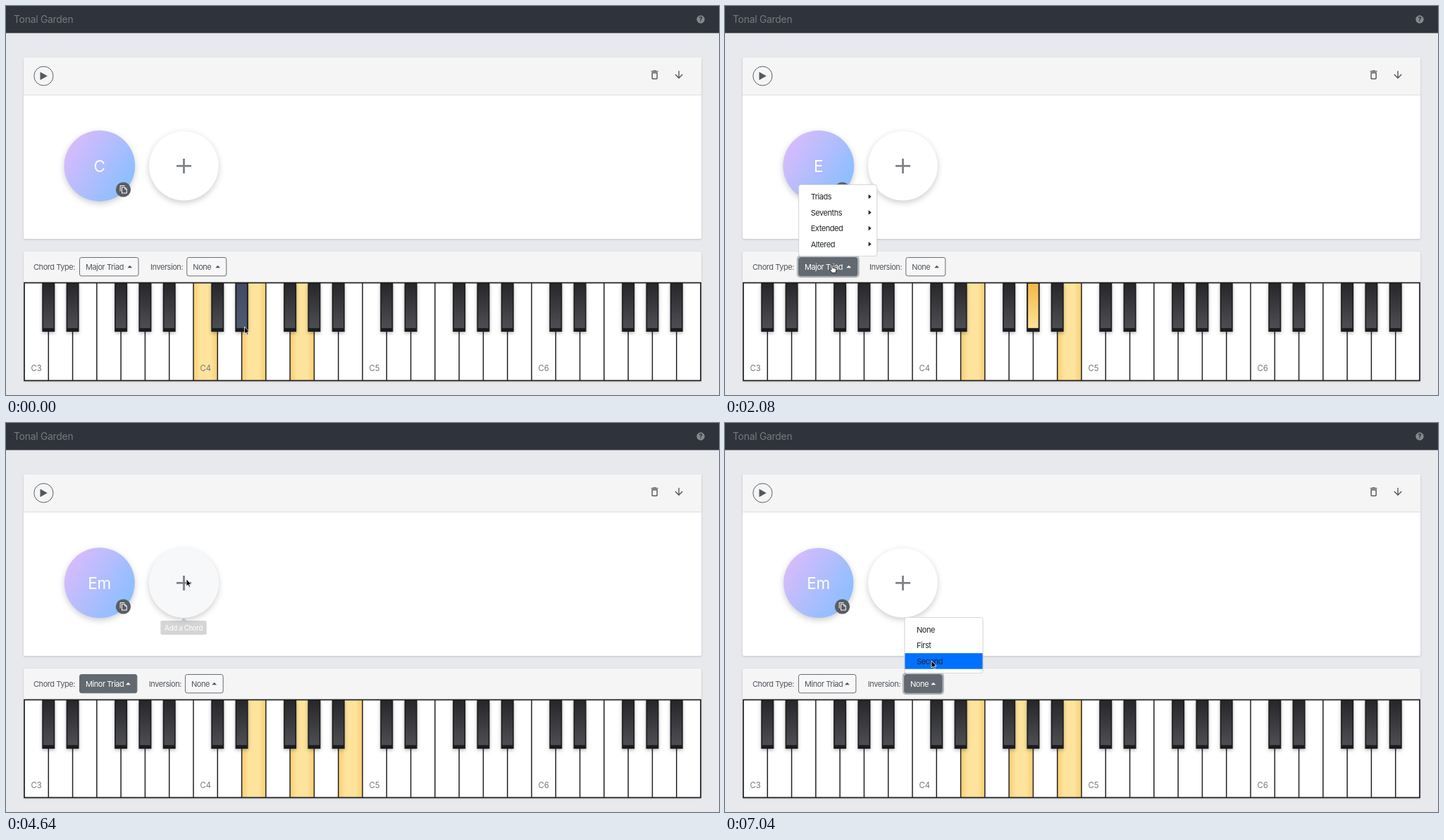
These frames come from a looping animation (1012x553 px, 7200 ms). An HTML page:

```html
<!DOCTYPE html>
<html lang="en">
<head>
<meta charset="utf-8">
<title>Tonal Garden</title>
<style>
  html, body { margin: 0; width: 100%; height: 100%; overflow: hidden; background: #e8e9ed; }
  svg { display: block; width: 100%; height: 100%; }
  text { font-family: Inter, Roboto, sans-serif; letter-spacing: -.04em; white-space: pre; }
  .card { filter: drop-shadow(0 1px 1.5px rgba(0,0,0,.16)); }
  .round { filter: drop-shadow(0 3px 4px rgba(0,0,0,.2)); }
  .menu { filter: drop-shadow(0 0 .5px rgba(0,0,0,.2)); }
  .black { filter: drop-shadow(0 2px 2.5px rgba(0,0,0,.28)); }
</style>
</head>
<body>
<script>
const LOOP = 7200, STEP = 160;
const KEY_W = 960 / 28, KEY_X = 26, KEY_TOP = 393.5, KEY_BOTTOM = 532.5;

// Event times in ms
const E_CHORD = 800, OPEN_TYPE = 1760, OPEN_TRIADS = 3360, EM_CHORD = 4480,
      OPEN_INVERSION = 5440, PRESS = 7040;

const range = n => [...Array(n).keys()];
const rect = (x, y, w, h, fill, more = '') =>
  `<rect x="${x}" y="${y}" width="${w}" height="${h}" fill="${fill}" ${more}/>`;
const path = (d, more = '') => `<path d="${d}" ${more}/>`;
const text = (s, x, y, size = 11, fill = '#212529', more = '') =>
  `<text x="${x}" y="${y + size * .364}" font-size="${size}" fill="${fill}" ${more}>${s}</text>`;
const during = (from, to, body) => `<g data-on="${from} ${to}">${body}</g>`;
const gradient = (id, dir, ...stops) =>
  `<linearGradient id="${id}" ${dir}>${stops.map(([o, c]) =>
    `<stop offset="${o}" stop-color="${c}"/>`).join('')}</linearGradient>`;

const DOWN = 'x1="0" y1="0" x2="0" y2="1"';
const defs = `<defs>
  ${gradient('chord', 'x1=".05" y1=".2" x2=".95" y2=".8"', [0, '#d9bbfc'], [1, '#88bfff'])}
  ${gradient('ebony', DOWN, [0, '#27272a'], [1, '#4d4e53'])}
  ${gradient('hover', DOWN, [0, '#414c62'], [1, '#4e5a72'])}
  ${gradient('gold', DOWN, [0, '#f4b748'], [1, '#fde496'])}
  ${gradient('amber', '', [0, '#f8cd71'], [.28, '#fde39b'], [.72, '#fde39b'], [1, '#f8cd71'])}
</defs>`;

function header() {
  return rect(0, 0, 1012, 38.5, '#2f333c') +
    text('Tonal Garden', 11, 19, 13.8, '#77797e', 'style="letter-spacing:-.015em"') +
    '<circle cx="986" cy="19" r="5.7" fill="#85888d"/>' +
    text('?', 986, 19.2, 9, '#2f333c', 'text-anchor="middle" font-weight="800"');
}

function toolbar() {
  const icon = (x, y, d) =>
    path(d, `transform="translate(${x} ${y}) scale(.703)" fill="#53575d" fill-rule="evenodd"`);
  return `<g class="card">${rect(25, 73, 962, 258, '#fff', 'rx="2.5"')}</g>` +
    path('M25 126.5V75.5Q25 73 27.500 73H984.5Q987 73 987 75.5V126.5Z', 'fill="#f5f5f5"') +
    rect(25, 126, 962, 1, '#dedede') +
    '<circle cx="53.4" cy="99.5" r="13.6" fill="none" stroke="#5a5f66"/>' +
    path('M48.500 93.800L58.800 99.500L48.500 105.200Z', 'fill="#53585f"') +
    icon(912.2, 89.4, 'M6 19c0 1.1.9 2 2 2h8c1.1 0 2-.9 2-2V7H6zM8 9h8v10H8zM15.5 4l-1-1h-5l-1 1H5v2h14V4z') +
    icon(946.6, 89.4, 'M20 12l-1.4-1.4L13 16.2V4h-2v12.200l-5.600-5.600L4 12l8 8z');
}

function circles() {
  const name = (s, from, to) =>
    during(from, to, text(s, 132.6, 228, 22.5, '#fff', 'text-anchor="middle" style="letter-spacing:-.01em"'));
  const copyIcon = path('M162.200 263.500V255.500H168.500M164.500 257.700H169L171.300 260V266H164.500ZM168.800 257.900V260.300H171',
    'fill="none" stroke="#fff"');
  return `<circle id="pulse" class="round" cx="132.8" cy="227.3" r="50" fill="url(#chord)"/>` +
    name('C', 0, E_CHORD) + name('E', E_CHORD, EM_CHORD) + name('Em', EM_CHORD, LOOP) +
    '<circle cx="166.5" cy="261" r="10.6" fill="#5a5d62"/>' + copyIcon +
    '<circle class="round" cx="252.4" cy="227.2" r="49.3" fill="#fff"/>' +
    during(EM_CHORD, 5120, '<circle cx="252.4" cy="227.2" r="49.3" fill="#f7f8fa"/>') +
    path('M242 227.400H263M252.500 217V238', 'stroke="#7f8288" stroke-width="2.8"') +
    `<g id="tip">${rect(219.3, 281, 65.4, 20, '#000', 'rx="2.5"')}` +
    path('M248.500 281L252.400 277L256.300 281Z') +
    text('Add a Chord', 252.2, 291.3, 9.7, '#fff', 'text-anchor="middle" style="letter-spacing:-.035em"') + '</g>';
}

function button(x, w, label, caretX, dark, ring) {
  const ink = dark ? '#fff' : '#50565d';
  return (ring ? rect(x - 1.2, 355.8, w + 2.4, 29.400, 'none', 'rx="4" stroke="#aeb3b8" stroke-width="2"') : '') +
    rect(x + .5, 357.5, w - 1, 26.300, dark ? '#626970' : '#f7f7f7', 'rx="2.8" stroke="#666d75"') +
    text(label, x + 9, 370.7, 11, ink) +
    path(`M${caretX} 372.300h6.800l-3.400-3.500z`, `fill="${ink}"`);
}

function controls() {
  const major = (from, to, dark, ring) => during(from, to, button(104, 84.5, 'Major Triad', 172.3, dark, ring));
  const minor = (from, to, dark) => during(from, to, button(104, 82.4, 'Minor Triad', 170, dark));
  const label = (s, x) => text(s, x, 370.7, 11, '#50565d');
  return `<g class="card">${rect(25, 349, 962, 184, '#f5f5f5', 'rx="2.5"')}</g>` +
    label('Chord Type:', 39) +
    major(0, OPEN_TYPE) + major(OPEN_TYPE, OPEN_TRIADS, true, true) + major(OPEN_TRIADS, EM_CHORD, true) +
    minor(EM_CHORD, 4800, true) + minor(4800, LOOP) +
    during(0, EM_CHORD, label('Inversion:', 205) + button(256.3, 57, 'None', 297.2)) +
    during(EM_CHORD, LOOP, label('Inversion:', 202.8)) +
    during(EM_CHORD, OPEN_INVERSION, button(254, 54.7, 'None', 292.3)) +
    during(OPEN_INVERSION, LOOP, button(254, 54.7, 'None', 292.3, true, true));
}

function piano() {
  const whiteX = i => KEY_X + i * KEY_W;
  const white = (i, fill) => rect(whiteX(i), KEY_TOP, KEY_W, KEY_BOTTOM - KEY_TOP, fill);
  const black = (i, fill) =>
    rect(whiteX(i) - 9, KEY_TOP, 18, 69.6, '#1c1c1f') + rect(whiteX(i) - 7.3, 394.5, 14.6, 63.3, fill);
  const golds = (...keys) => keys.map(i => white(i, 'url(#amber)')).join('');
  const sharps = range(28).filter(i => [1, 2, 4, 5, 6].includes(i % 7));
  return rect(KEY_X, KEY_TOP, 960, KEY_BOTTOM - KEY_TOP, '#fff') +
    during(1120, 1440, white(6, '#efefef')) +
    during(0, E_CHORD, golds(7, 9, 11)) +
    during(E_CHORD, EM_CHORD, golds(9, 13)) +
    during(EM_CHORD, LOOP, golds(9, 11, 13)) +
    path(range(27).map(i => `M${whiteX(i + 1)} ${KEY_TOP}V${KEY_BOTTOM}`).join(''),
      'stroke="#222" stroke-width="1.5"') +
    `<g class="black">${sharps.map(i => black(i, 'url(#ebony)')).join('')}</g>` +
    during(0, 320, black(9, 'url(#hover)')) +
    during(E_CHORD, EM_CHORD, black(12, 'url(#gold)')) +
    rect(KEY_X, KEY_TOP, 960, KEY_BOTTOM - KEY_TOP, 'none', 'stroke="#1d1d1f" stroke-width="1.7"') +
    range(4).map(i => text('C' + (i + 3), whiteX(i * 7) + 9.5, 514.500, 11.3, '#75777a',
      'style="letter-spacing:0"')).join('');
}

function menu(x, w, lastY, items, lit, arrows) {
  const top = lastY - (items.length - 1) * 22.5, y = i => top + i * 22.5;
  return `<g class="menu">${rect(x, top - 17, w, lastY - top + 34, '#fff', 'rx="2.8" stroke="#d2d3d5" stroke-width=".8"')}</g>` +
    lit.map(([i, from, to, fill = '#f7f8fa']) =>
      during(from, to, rect(x + .4, y(i) - 11.3, w - .8, 22.5, fill))).join('') +
    items.map((s, i) => text(s, x + 17, y(i)) + (arrows
      ? path(`M${x + 99} ${y(i) - 3.3}l4 3.300l-4 3.300z`, 'fill="#212529"') : '')).join('');
}

function menus() {
  const types = menu(104.7, 111, 338.5, ['Triads', 'Sevenths', 'Extended', 'Altered'],
    [[0, 2400, 2720], [1, 2720, OPEN_TRIADS], [0, OPEN_TRIADS, EM_CHORD]], true);
  const triads = menu(217, 117, 271, ['Major Triad', 'Minor Triad', 'Augmented Triad', 'Diminished Triad'],
    [[3, 3680, 4000], [2, 4000, 4160], [1, 4160, EM_CHORD]]);
  const inversions = menu(255, 111, 338.5, ['None', 'First', 'Second'],
    [[1, 6080, 6400], [2, 6400, PRESS], [2, PRESS, LOOP, '#0070ff']]);
  return during(OPEN_TYPE, EM_CHORD, types) +
    during(OPEN_TRIADS, EM_CHORD, triads +
      rect(103.3, 258.600, 113, 25, 'none', 'rx="1" stroke="#5696f5" stroke-width="2.2"')) +
    during(OPEN_INVERSION, LOOP, inversions);
}

function status() {
  return during(5600, 6240,
    path('M0 538.500H73.500Q76.500 538.500 76.500 541.500V553H0Z', 'fill="#292b2f" stroke="#55575b" stroke-width=".6"') +
    text('localhost:63714/#', 3.3, 546, 8.6, '#cfd0d2', 'style="letter-spacing:-.03em"'));
}

const cursor = `<g id="cursor" stroke-linejoin="round">
  ${path('M0 0V10L2.400 7.900L4 11.400L5.600 10.700L4.100 7.400H7Z', 'id="arrow" fill="#000" stroke="#fff" stroke-width=".8"')}
  ${path('M-1 7V1Q-1 0 0 0Q1.100 0 1.100 1V4.300L5 5.100Q6.200 5.500 6 7L5.200 11.300H0L-3 7.600Q-3.400 6.200-2.200 6.100Z',
    'id="hand" fill="#fff" stroke="#111" stroke-width=".9"')}
</g>`;

document.body.innerHTML = `<svg viewBox="0 0 1012 553">${defs}${header()}${toolbar()}${circles()}
  ${controls()}${piano()}${menus()}${status()}${cursor}</svg>`;

// Pointer track: time, x, y
const track = [
  [0, 338.5, 456], [480, 352, 492], [960, 350, 488], [1120, 254, 448], [1280, 199, 399.7],
  [1600, 152, 368], [2240, 152, 368], [2560, 166, 274], [2880, 176.500, 291.500], [3200, 172, 289],
  [3360, 164, 268], [3520, 182, 267], [3840, 289, 260.500], [4000, 284, 246], [4160, 262, 226],
  [4640, 256, 222], [5120, 256, 222], [5440, 288, 366.500], [5920, 288, 366.500],
  [6240, 290, 314], [6560, 293, 338], [LOOP, 293, 338]
];
const handTimes = [[1600, EM_CHORD], [OPEN_INVERSION, PRESS]];

function pointerAt(t) {
  const i = track.findIndex(p => p[0] > t);
  const [t0, x0, y0] = track[i - 1], [t1, x1, y1] = track[i];
  const k = (t - t0) / (t1 - t0);
  return [x0 + (x1 - x0) * k, y0 + (y1 - y0) * k];
}

const byId = id => document.getElementById(id);
const show = (el, on) => el.setAttribute('visibility', on ? 'visible' : 'hidden');
const windows = [...document.querySelectorAll('[data-on]')].map(el =>
  [el, ...el.dataset.on.split(' ').map(Number)]);

function draw(t) {
  for (const [el, from, to] of windows) el.style.display = t >= from && t < to ? '' : 'none';
  byId('pulse').setAttribute('r', 50.1 + .5 * Math.cos((t - 2500) / 3000 * 2 * Math.PI));
  byId('tip').setAttribute('opacity', t < 4640 || t >= 5280 ? 0 : t < 4800 || t >= 5120 ? .16 : .88);
  byId('cursor').setAttribute('transform', `translate(${pointerAt(t)})`);
  const hand = handTimes.some(([from, to]) => t >= from && t < to);
  show(byId('hand'), hand);
  show(byId('arrow'), !hand);
}

const start = performance.now();
function tick() {
  const t = (performance.now() - start) % LOOP;
  draw(Math.floor(t / STEP) * STEP);
  requestAnimationFrame(tick);
}
tick();
</script>
</body>
</html>
```
